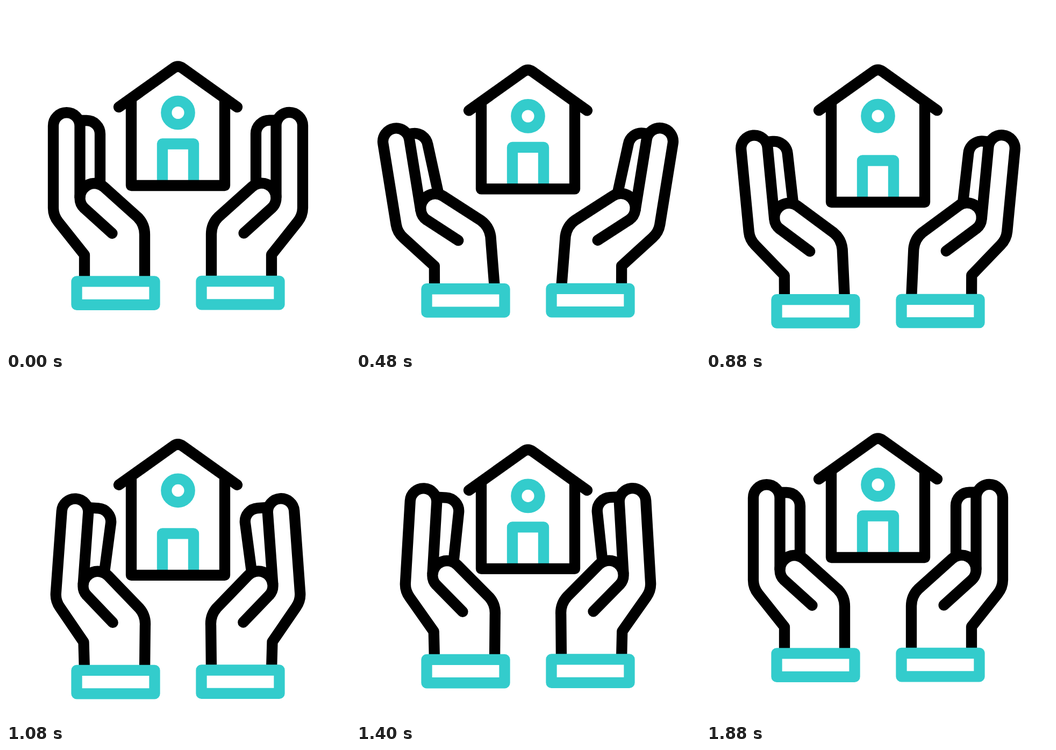
Recreate the animation shown at these times as an HTML page. Size 640 by 640 pixels, loop 1960 ms.

```html
<!DOCTYPE html>
<html lang="en">
<head>
<meta charset="utf-8">
<title>House in caring hands</title>
<style>
  html, body { margin: 0; height: 100%; overflow: hidden; background: #fff; }
  svg { display: block; width: 100vw; height: 100vh; }
  .line { fill: none; stroke: #000; stroke-width: 20.3; stroke-linejoin: round; }
  .teal { stroke: #3cc; }
  .round { stroke-linecap: round; }
  .solid { fill: #fff; }
</style>
</head>
<body>
<svg viewBox="0 0 640 640">
  <g id="hand">
    <g id="palm">
      <path id="finger" class="line"/>
      <path id="outer" class="line solid"/>
      <path id="thumb" class="line"/>
      <path class="line round" d="M197.5 423L145.5 376"/>
    </g>
    <rect class="line teal" x="131.5" y="512.4" width="145" height="43.4"/>
  </g>
  <use href="#hand" transform="matrix(-1 0 0 1 640 -.4)"/>
  <path id="door" class="line teal" d="M291 330V256.5H349V330"/>
  <path id="walls" class="line"/>
  <g id="roof">
    <path class="line round" d="M210 188L311 116Q320 109.4 329 116L430 188"/>
    <circle class="line teal" cx="320" cy="198.5" r="21.7"/>
  </g>
</svg>
<script>
  const LOOP = 1960, STEP = 40;
  const PIVOT = { x: 192, y: 440 };
  const $ = id => document.getElementById(id);

  // Eased progress from 0 to 1 between two times.
  function ease(t, from, to) {
    const p = Math.min(1, Math.max(0, (t - from) / (to - from)));
    return p * p * (3 - 2 * p);
  }

  function place(id, transform) {
    $(id).setAttribute('transform', transform);
  }

  function trace(id, d) {
    $(id).setAttribute('d', d);
  }

  // Where a point fixed to the cuff lies inside the turned palm.
  function inPalm(x, y, tilt, slide) {
    const r = -tilt * Math.PI / 180, c = Math.cos(r), s = Math.sin(r);
    const dx = x - slide - PIVOT.x, dy = y - PIVOT.y;
    return `${PIVOT.x + dx * c - dy * s} ${PIVOT.y + dx * s + dy * c}`;
  }

  function drawHand(t) {
    const open = ease(t, 160, 660);
    const close = ease(t, 680, 1120);
    const rest = ease(t, 1200, 1800);
    const tilt = -13 * open + 17.5 * close - 4.5 * rest;
    const bend = -7.5 * open + 13.5 * close - 6 * rest;
    const slide = Math.min(0, tilt) * 0.48;
    const drop = 34 * ease(t, 200, 840) - 2.5 * ease(t, 840, 1080) -
      31.5 * ease(t, 1080, 1620);

    place('hand', `translate(0 ${drop})`);
    place('palm', `translate(${slide} 0) rotate(${tilt} ${PIVOT.x} ${PIVOT.y})`);
    trace('finger', `M128 213H${150 + bend}a25 25 0 0 1 25 25L175 333`);
    trace('outer', `M${inPalm(146, 512, tilt, slide)}L146 463L97.5 402` +
      'C91 394 88 385 88 376V223A24.75 24.75 0 0 1 137.5 223V357');
    trace('thumb', 'M145.5 376C140 371 137.5 365 137.5 357' +
      'A27 27 0 0 1 182.6 337L245 393C253 401 258 412 258 425' +
      `L${inPalm(258, 512, tilt, slide)}`);
  }

  function drawHouse(t) {
    const base = 33 * (ease(t, 280, 985) - ease(t, 1060, 1890));
    const stretch = 25 * (ease(t, 490, 900) - ease(t, 1000, 1380));
    const top = base - stretch;

    place('roof', `translate(0 ${top})`);
    place('door', `translate(0 ${base})`);
    trace('walls', `M233 ${175 + top}V${334 + base}H407V${175 + top}`);
  }

  const start = performance.now();
  function tick() {
    const now = (performance.now() - start) % LOOP;
    const t = Math.floor(now / STEP) * STEP;
    drawHand(t);
    drawHouse(t);
    requestAnimationFrame(tick);
  }
  tick();
</script>
</body>
</html>
```
